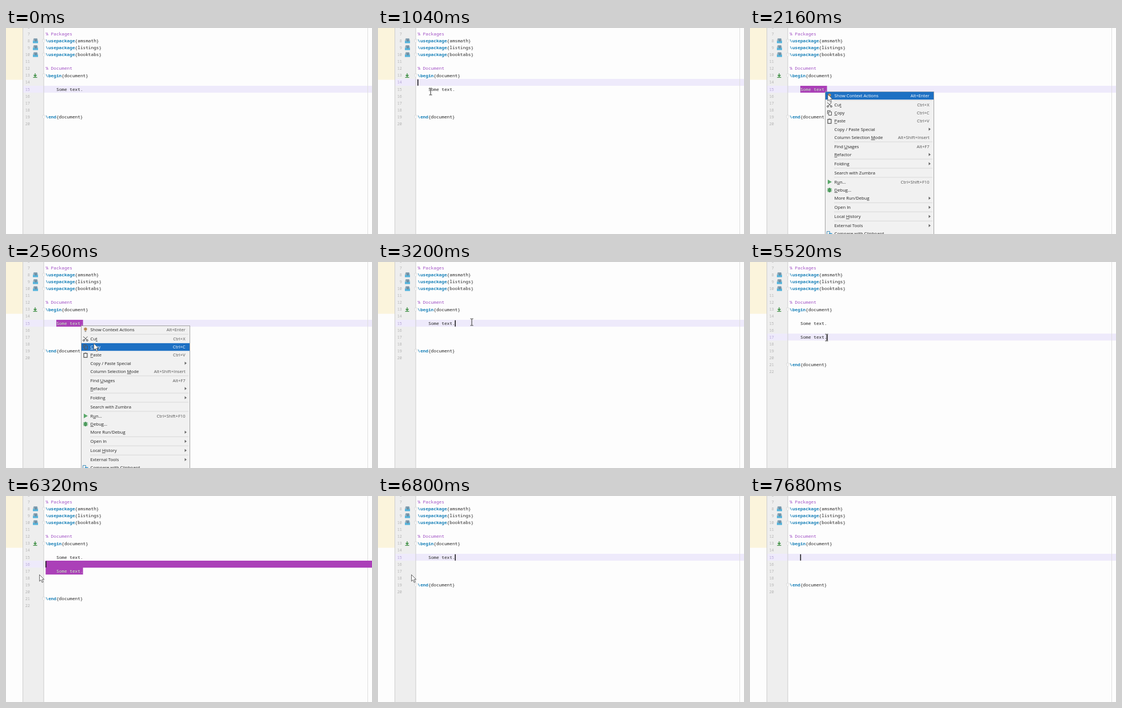
Recreate the animation shown at these times as an HTML page. Size 640 by 360 pixels, loop 8 s.

```html
<!DOCTYPE html>
<html lang="en">
<head>
<meta charset="utf-8">
<title>Editor</title>
<style>
  html, body { margin: 0; width: 100%; height: 100%; overflow: hidden; background: #fdfdfd; }
  svg { display: block; width: 640px; height: 360px; }
  text { white-space: pre; }
  .code { font: 7.78px "Noto Sans Mono", monospace; fill: #262626; }
  .num { font: 6.7px "Noto Sans Mono", monospace; fill: #b2b2b2; text-anchor: end; }
  .num.on { fill: #b3a2d6; }
  .key { font-weight: 700; fill: #1880b8; }
  .note { fill: #a04fc4; }
  .menu { font: 7.65px "Open Sans", sans-serif; fill: #222; }
  .menu .hint { text-anchor: end; fill: #555; }
  .menu .bar { fill: none; }
  .menu .on, .menu .on .hint { fill: #fff; }
  .menu .on .bar { fill: #1d70c3; }
  .arrow { fill: #666; }
  .mnemonic { text-decoration: underline; }
</style>
</head>
<body>
<svg viewBox="0 0 640 360" xmlns="http://www.w3.org/2000/svg">
  <defs>
    <clipPath id="picked"><path id="clip"/></clipPath>
    <g id="stack">
      <path d="M48.5-4.5h6l1.5 4.5h-9z" fill="#8fa9b8"/>
      <path d="M47 0h9v4h-9z" fill="#55b4dc"/>
      <path d="M50-3h4v4h-4z" fill="#6d8fa5"/>
    </g>
    <path id="fold" d="M64-2.5h4.6v3.4L66.3 3 64 .9zM65.2-.3h2.2" fill="#fff" stroke="#cfcfcf" stroke-width=".7"/>
  </defs>
  <rect width="640" height="360" fill="#fdfdfd"/>
  <rect width="29.5" height="90.5" fill="#fbf4dc"/>
  <rect x="29.5" width="36.5" height="360" fill="#eee"/>
  <rect id="line" x="30" width="610" height="12.1" fill="#eeeafb"/>
  <path d="M29.5 0V360M66 0V360" stroke="#cdcdcd"/>
  <path d="M632.5 0V360" stroke="#dedede"/>
  <path id="select" fill="#ab40b8"/>
  <g id="nums"></g>
  <g id="code"></g>
  <g id="live"></g>
  <g id="lit" clip-path="url(#picked)"></g>
  <rect id="caret" width="1.5" height="11" fill="#111"/>
  <g id="menu" class="menu"></g>
  <path id="beam" d="M-2.5-6Q-.3-6 0-5 .3-6 2.5-6M0-5V5M-2.5 6Q-.3 6 0 5 .3 6 2.5 6" fill="none" stroke="#777" stroke-width="1.6"/>
  <path id="pointer" d="M0 0V11.5L2.7 9 4.6 13.6 6.6 12.7 4.7 8.3H8.2Z" fill="#fff" stroke="#555" stroke-width=".9"/>
</svg>
<script>
const $ = id => document.getElementById(id);
const LOOP = 8000, STEP = 80, LEFT = 69.3, CHAR = 4.668, PITCH = 12.07;
const rowY = n => 101 + (n - 15) * PITCH;
const colX = c => LEFT + c * CHAR;
const show = (el, on) => el.style.display = on ? '' : 'none';
const text = (n, s, col = 0, extra = '') =>
  `<text class="code" x="${colX(col)}" y="${rowY(n) + 8.7}" ${extra}>${s}</text>`;
const command = (name, arg) => `<tspan class="key">\\${name}</tspan>{${arg}}`;
const use = (id, n) => `<use href="#${id}" y="${rowY(n) + 6}"/>`;

// Fixed part of the document
const note = s => `<tspan class="note">% ${s}</tspan>`;
$('code').innerHTML =
  text(7, note('Packages')) + text(12, note('Document')) +
  ['amsmath', 'listings', 'booktabs'].map((p, i) =>
    text(8 + i, command('usepackage', p)) + use('stack', 8 + i)).join('') +
  text(13, command('begin', 'document')) +
  [8, 10, 13].map(n => use('fold', n)).join('') +
  '<path d="M51 79.2V84M48.6 82L51 84.6 53.4 82M47.5 86.4h7" fill="none" stroke="#3f8f45" stroke-width="1.4"/>';

const sentence = 'Some text.', white = 'style="fill:#fff"';
$('live').innerHTML = text(15, sentence, 4, 'id="first"') + text(17, sentence, 4, 'id="second"') +
  `<g id="tail">${text(19, command('end', 'document'))}${use('fold', 19)}</g>`;
$('lit').innerHTML = text(15, sentence, 4, white) + text(17, sentence, 4, white);
for (let n = 6; n <= 22; n++)
  $('nums').innerHTML += `<text class="num" x="41.7" y="${rowY(n) + 8.5}">${n}</text>`;
const nums = [...$('nums').children];

// Context menu: label (underscore marks the mnemonic), hint, "-" for a separator
const entries = [
  ['Show Context Actions', 'Alt+Enter'], '-',
  ['Cu_t', 'Ctrl+X'], ['_Copy', 'Ctrl+C'], ['_Paste', 'Ctrl+V'], ['Copy / Paste Special', '>'],
  ['Column Selection _Mode', 'Alt+Shift+Insert'], '-',
  ['Find _Usages', 'Alt+F7'], ['_Refactor', '>'], '-',
  ['Folding', '>'], '-', ['Search with Zumbra', ''], '-',
  ['R_un...', 'Ctrl+Shift+F10'], ['_Debug...', ''], ['More Run/Debug', '>'], '-',
  ['Open In', '>'], '-', ['Local _History', '>'], '-',
  ['External Tools', '>'], ['Compare with Clip_board', '']
];
const items = [];
let itemY = 118.3;
let html = '<rect x="131.5" y="111.5" width="190" height="260" fill="#f1f1f1" stroke="#a3a3a3"/>';
for (const entry of entries) {
  if (entry === '-') {
    html += `<path d="M147 ${itemY - 6.3}H319" stroke="#d2d2d2" stroke-width=".8"/>`;
    itemY += 1.75;
    continue;
  }
  const [label, hint] = entry;
  items.push(itemY);
  html += `<g class="item"><rect class="bar" x="132" y="${itemY - 6.6}" width="189" height="13.4"/>` +
    `<text x="147.6" y="${itemY + 2.8}">${label.replace(/_(.)/, '<tspan class="mnemonic">$1</tspan>')}</text>` +
    (hint === '>' ? `<path class="arrow" d="M312.5 ${itemY - 2.6}l3.4 2.6-3.4 2.6z"/>`
      : `<text class="hint" x="313.6" y="${itemY + 2.8}">${hint}</text>`) + '</g>';
  itemY += 14.2;
}
const icon = (i, body) => `<g transform="translate(139 ${items[i]})" fill="none" stroke="#555">${body}</g>`;
html +=
  icon(0, '<circle r="2.7" cy="-1" fill="#b98a52" stroke="none"/><path d="M-1.3 3h2.6"/>') +
  icon(1, '<path d="M-4-4L3 2M3.5-4L-2 2"/><circle cx="-3" cy="2.8" r="1.4"/><circle cx="3" cy="2.8" r="1.4"/>') +
  icon(2, '<path d="M-3.5 2V-4H2M-1.5-2H3.5V4H-1.5z"/>') +
  icon(3, '<path d="M-3-3H3V4H-3zM-1.3-3.5H1.3" stroke-width="1.2"/>') +
  icon(10, '<path d="M-3-4L4 0-3 4z" fill="#59a869" stroke="none"/>') +
  icon(11, '<path d="M-4-3L4 3M4-3L-4 3M-4.5 0h9" stroke="#59a869"/><ellipse rx="2.7" ry="4" fill="#4c9a5c" stroke="none"/>') +
  icon(16, '<path d="M-4.5-4H.5V3H-4.5z" stroke="#4a90b8"/><path d="M-1-1H4.5V4H-1z" fill="#3d9bd0" stroke="none"/>');
$('menu').innerHTML = html;
const rows = [...document.querySelectorAll('.item')];

// Mouse: time, x, y, shape (i = beam, a = arrow, empty = hidden)
const path = [
  [0, 0, 0, ''], [400, 108, 242, 'i'], [480, 168, 199, 'i'], [560, 146, 174, 'i'],
  [640, 172, 128, 'i'], [720, 185, 90, 'i'], [800, 183, 91, 'i'], [960, 122, 113, 'i'],
  [1040, 92, 111, 'i'], [1200, 88, 108, 'i'], [1280, 89, 108, 'i'], [1760, 136, 117, 'i'],
  [1840, 136, 117, 'i'], [1920, 112, 108, 'i'], [2000, 131, 111, 'i'], [2080, 133, 113, 'a'],
  [2160, 136, 116, 'a'], [2400, 149, 133, 'a'], [2640, 156, 147, 'a'], [2720, 157, 148, 'a'],
  [2800, 158, 146, 'i'], [3120, 164, 105, 'i'], [3200, 164, 105, 'i'], [3360, 168, 108, 'i'],
  [3440, 0, 0, ''], [4560, 151, 176, 'i'], [5200, 158, 133, 'i'], [5360, 138, 133, 'i'],
  [5520, 134, 132, 'i'], [6080, 70, 119, 'i'], [6160, 63, 122, 'a'], [6320, 58.5, 137.5, 'a'],
  [7520, 58.5, 137.5, 'a'], [7600, 48, 131, 'a'], [7680, 0, 0, '']
];
function mouseAt(t) {
  let i = path.length - 1;
  while (path[i][0] > t) i--;
  const [t0, x0, y0, shape] = path[i], next = path[i + 1];
  if (!shape || !next || !next[3]) return { x: x0, y: y0, shape };
  const k = (t - t0) / (next[0] - t0);
  return { x: x0 + (next[1] - x0) * k, y: y0 + (next[2] - y0) * k, shape };
}

// Editor state changes; last = number of the final line
const changes = [
  [0, { row: 15, col: 14, caret: false, last: 20, first: true, second: false, menu: false, anchor: null, drag: false }],
  [720, { row: 14, col: 0, caret: true }],
  [1280, { row: 15, anchor: [15, 4], drag: true }],
  [1840, { col: 14, drag: false }],
  [2080, { menu: true, caret: false }],
  [2800, { menu: false, caret: true }],
  [3120, { anchor: null }],
  [3680, { caret: false }],
  [4000, { row: 16, col: 4, last: 21, caret: true }],
  [4080, { row: 17, last: 22 }],
  [4480, { second: true, col: 14 }],
  [5520, { anchor: [17, 14], drag: true }],
  [6160, { row: 16, col: 0, drag: false }],
  [6480, { anchor: null, second: false, last: 21 }],
  [6640, { row: 15, col: 14, last: 20 }],
  [6960, { anchor: [15, 14], col: 4 }],
  [7200, { anchor: null, first: false }]
];

function selection(anchor, row, col) {
  const box = (n, a, b) => `M${a} ${rowY(n)}H${b}v${PITCH}H${a}z`;
  if (!anchor) return '';
  const [n, c] = anchor;
  if (n === row) return box(n, colX(Math.min(c, col)), colX(Math.max(c, col)));
  return box(row, colX(col), 640) + box(n, LEFT, colX(c));
}

function draw(t) {
  const s = Object.assign({}, ...changes.filter(c => c[0] <= t).map(c => c[1]));
  const m = mouseAt(t);
  if (s.drag) {
    s.col = Math.max(0, Math.min(14, Math.round((m.x - LEFT) / CHAR)));
    if (s.anchor[0] === 17 && m.y < rowY(17)) {
      s.row = 16;
      s.col = 0;
    }
  }
  $('line').setAttribute('y', rowY(s.row));
  const shape = selection(s.anchor, s.row, s.col);
  $('select').setAttribute('d', shape);
  $('clip').setAttribute('d', shape);
  $('caret').setAttribute('x', colX(s.col) - .3);
  $('caret').setAttribute('y', rowY(s.row) + .8);
  show($('caret'), s.caret);
  show($('first'), s.first);
  show($('second'), s.second);
  show($('lit'), s.anchor);
  $('tail').setAttribute('transform', `translate(0 ${(s.last - 20) * PITCH})`);
  nums.forEach((el, i) => {
    show(el, i + 6 <= s.last);
    el.classList.toggle('on', i + 6 === s.row);
  });
  show($('menu'), s.menu);
  const hover = items.findIndex(v => Math.abs(v - m.y) < 8);
  rows.forEach((el, i) => el.classList.toggle('on', i === hover));
  for (const [id, kind] of [['beam', 'i'], ['pointer', 'a']]) {
    show($(id), m.shape === kind);
    $(id).setAttribute('transform', `translate(${m.x} ${m.y})`);
  }
}

let start = null, drawn = -1;
function tick(now) {
  start ??= now;
  const t = Math.floor((now - start) % LOOP / STEP) * STEP;
  if (t !== drawn) draw(drawn = t);
  requestAnimationFrame(tick);
}
draw(0);
requestAnimationFrame(tick);
</script>
</body>
</html>
```
